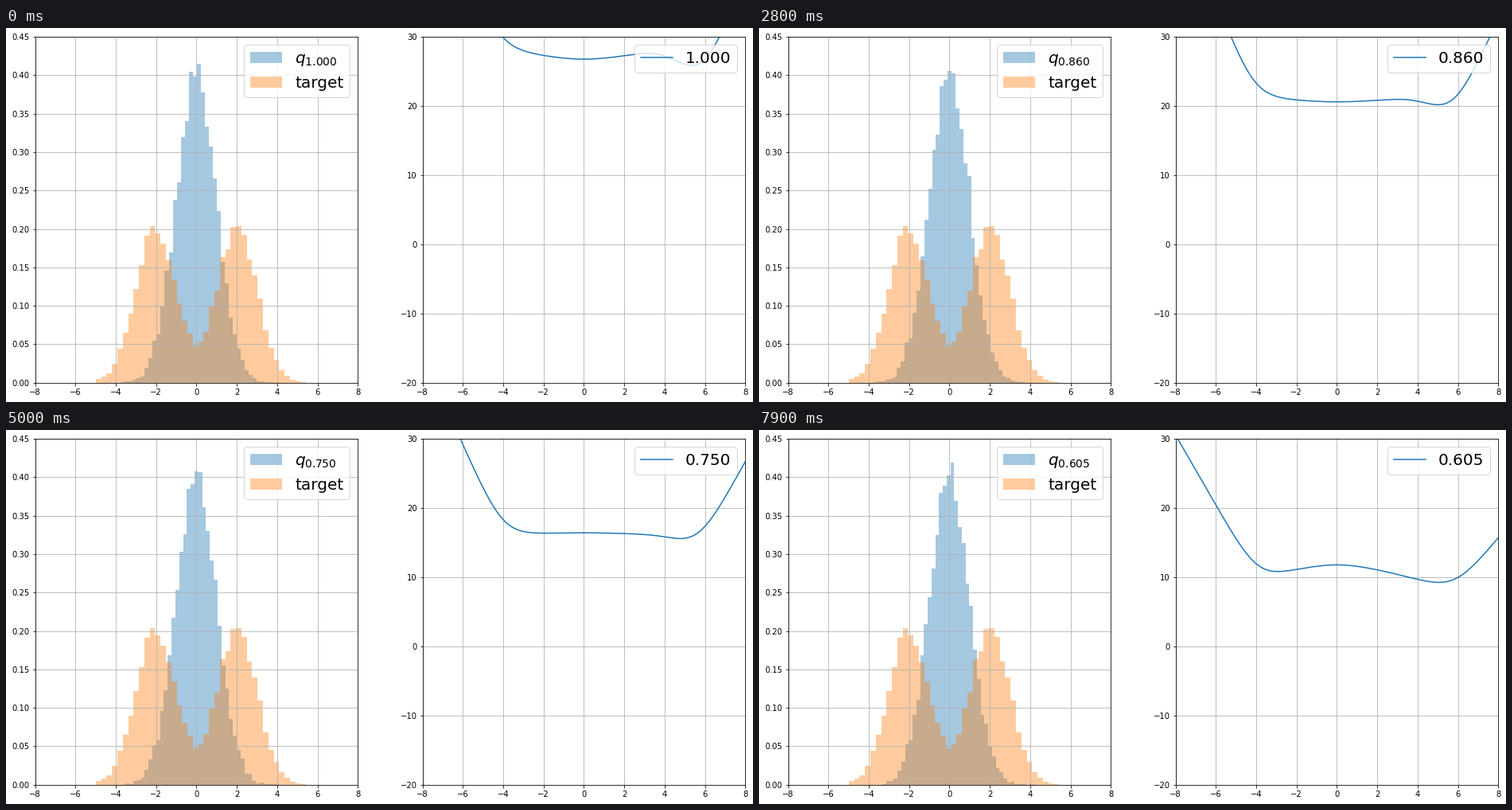
Animation, 939 px wide and 470 px high, one loop 8000 ms. Source, as a matplotlib script:

```python
import numpy as np
import matplotlib.pyplot as plt
from matplotlib.animation import FuncAnimation

W, H, DPI = 939, 470, 72
FRAMES, INTERVAL = 80, 100
BINS, SAMPLES = 40, 10000
STEP = 0.005
AX_W, AX_H, AX_BOTTOM = 405.82, 434.9, 24.2
XS = np.linspace(-8, 8, 400)

plt.rcParams["font.family"] = "DejaVu Sans"

rng = np.random.default_rng(7)
q_samples = rng.standard_normal(SAMPLES)
# Two equal unit normals around -2 and 2
target_samples = rng.standard_normal(SAMPLES) + np.where(np.arange(SAMPLES) % 2, 2, -2)


def density(samples, edges):
    counts, _ = np.histogram(samples, edges)
    return counts / (SAMPLES * (edges[1] - edges[0]))


def q_edges(i):
    """Bin edges follow the sample range as its left tail pulls in."""
    pull = 1 - (1 - i / (FRAMES - 1)) ** 1.5
    left = -4.16 + 0.83 * pull
    width = 0.1987 - 0.0114 * pull
    return left + width * np.arange(BINS + 1)


def ramp(x, soft):
    """Zero below 0, slope 1 above, with a soft corner."""
    return soft * np.logaddexp(0, x / soft)


def energy(t):
    """Flat floor with a wall on the left, a dip and a wall on the right."""
    s = 1 - t
    floor = 26.75 - 47.4 * s + 24 * s**2
    bend = 0.19 - 0.5 * s - 1.7 * s**2
    left_slope = 8 - 5 * s
    left_at = 4.35 - 1.6 * s + 1.3 * s**2
    dip_slope = 2.4 - 6.9 * s + 2.1 * s**2
    right_slope = 8.6 - 7.5 * s - 7.3 * s**2
    right_at = 5.92 - 0.18 * s - 9 * s**2 + 22.7 * s**3
    return (floor
            + bend * XS**2 / (1 + np.abs(XS) / 4)
            + left_slope * ramp(-XS - left_at, 0.5)
            - dip_slope * ramp(XS - 3.7, 0.4)
            + right_slope * ramp(XS - right_at, 0.4 + 0.4 * s))


def make_axes(left):
    return fig.add_axes([left / W, AX_BOTTOM / H, AX_W / W, AX_H / H])


def draw_bars(ax, edges, heights, color, label):
    return ax.bar(edges[:-1], heights, edges[1] - edges[0], align="edge",
                  color=color, alpha=0.4, label=label)


def finish(ax, ylim, yticks):
    ax.set(xlim=(-8, 8), ylim=ylim, xticks=range(-8, 9, 2), yticks=yticks)
    ax.grid(True)
    return ax.legend(fontsize=20, loc="upper right").get_texts()[0]


fig = plt.figure(figsize=((W + 0.001) / DPI, (H + 0.001) / DPI), dpi=DPI)
ax_hist, ax_energy = make_axes(36.55), make_axes(523.53)

edges = q_edges(0)
q_bars = draw_bars(ax_hist, edges, density(q_samples, edges), "C0", "$q_{1.000}$")
edges = np.linspace(-4.99, 5.70, BINS + 1)
draw_bars(ax_hist, edges, density(target_samples, edges), "C1", "target")
curve, = ax_energy.plot(XS, energy(1.0), color="C0", lw=1.5, label="1.000")

q_text = finish(ax_hist, (0, 0.45), np.arange(10) * 0.05)
t_text = finish(ax_energy, (-20, 30), range(-20, 31, 10))


def update(i):
    t = 1 - STEP * i
    edges = q_edges(i)
    for bar, x, h in zip(q_bars, edges, density(q_samples, edges)):
        bar.set_bounds(x, 0, edges[1] - edges[0], h)
    curve.set_ydata(energy(t))
    q_text.set_text(f"$q_{{{t:.3f}}}$")
    t_text.set_text(f"{t:.3f}")
    return [*q_bars, curve, q_text, t_text]


anim = FuncAnimation(fig, update, frames=FRAMES, interval=INTERVAL, repeat=True,
                     repeat_delay=0, init_func=lambda: update(0))
plt.show()
```
